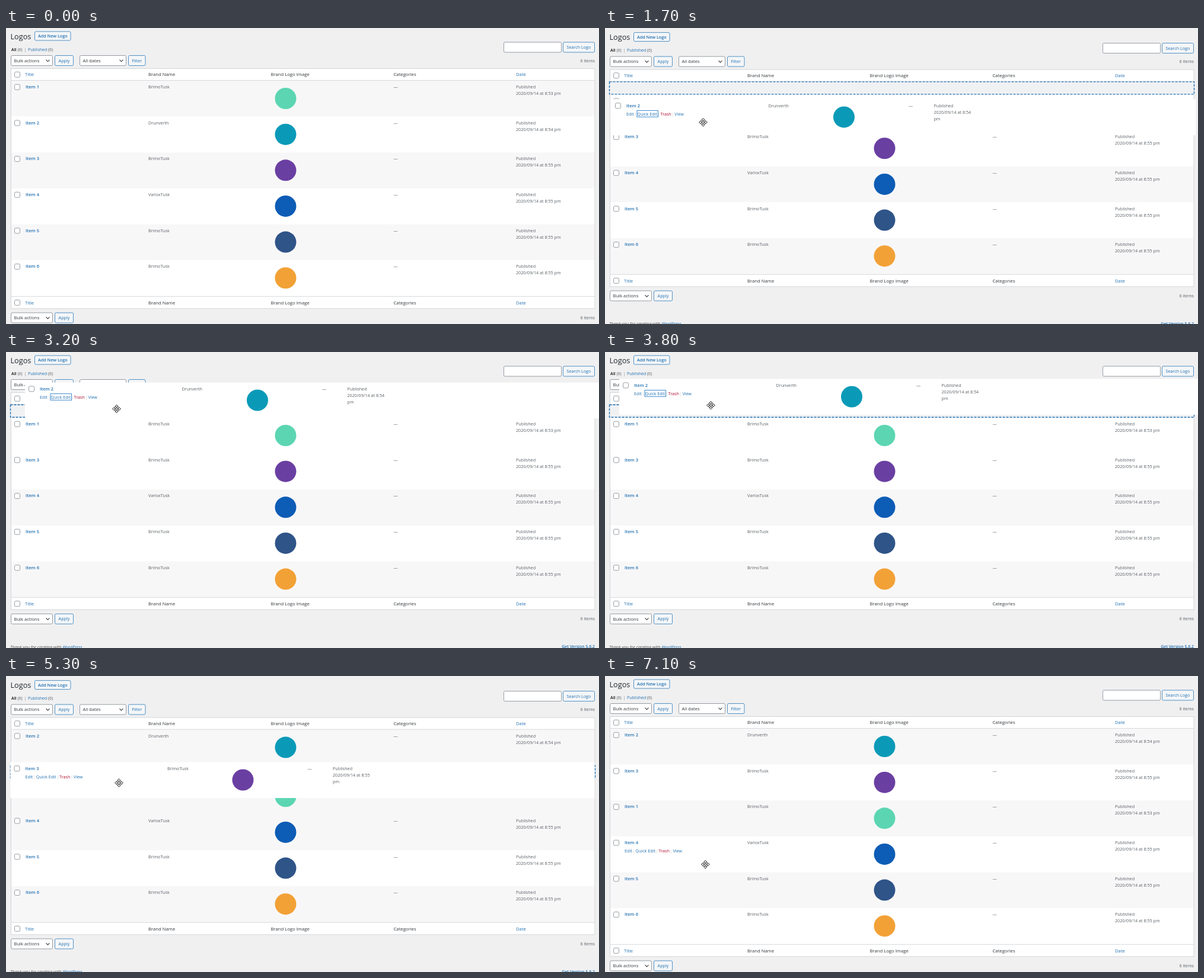
An HTML page for the animation above (7.2 s loop, 1000x500 px).

```html
<!DOCTYPE html>
<html lang="en">
<head>
<meta charset="utf-8">
<title>Logos</title>
<style>
  html, body { margin: 0; width: 100%; height: 100%; overflow: hidden; background: #f0f0f1; }
  svg { display: block; width: 100%; height: 100%; font-family: "Open Sans", "Noto Sans", sans-serif; }
</style>
</head>
<body>
<svg id="stage" viewBox="0 0 1000 500"></svg>
<script>
const stage = document.getElementById('stage');
const LOOP = 7200, STEP = 100;
const BLUE = '#2271b1', DARK = '#32373c', GRAY = '#5a6066', RED = '#b01030';
const LEFT = 8, WIDTH = 985, TOP = 89, ROW = 60.65, GAP = 22, TITLE = 10.5;
const COLS = [240, 446.5, 653.5, 860];
const LIFTED_COLS = [272.5, 375, 509, 551.5];

const brands = ['BrimoTusk', 'Drunverth', 'BrimoTusk', 'VarloxTusk', 'BrimoTusk', 'BrimoTusk'];
const colors = ['#5cd6b2', '#0a9ab8', '#6a3fa2', '#0d5cb5', '#2f5488', '#f2a136'];

// Key points are [time, x, y]; a drag's path gives the lifted row's x shift and title height
const drags = [
  { item: 1, from: 1000, to: 3900, gripX: 162.5, gripY: [24.5, 34],
    path: [[1000, 0, 161.7], [1300, .5, 157], [2300, 7.5, 83], [2800, -7, 11.5], [3200, 24, 62], [3600, 16, 56]] },
  { item: 2, from: 5000, to: 6000, gripX: 191, gripY: [24.5, 24.5],
    path: [[5000, 0, 222], [5300, -.5, 156], [5500, 12, 142], [5700, 0, 150]] }
];
const freePath = [[100, 200, 440], [800, 162.5, 186], [3900, 178.5, 90], [4500, 154.3, 248],
  [4800, 191, 246.5], [6000, 191, 174.5], [6900, 169.3, 318.3]];

const clamp = (v, lo, hi) => Math.max(lo, Math.min(hi, v));
const mix = (a, b, k) => a + (b - a) * k;
const ease = k => k * k * (3 - 2 * k);

function along(path, t) {
  const n = clamp(path.findLastIndex(p => p[0] <= t), 0, path.length - 2);
  const a = path[n], b = path[n + 1];
  const k = ease(clamp((t - a[0]) / (b[0] - a[0]), 0, 1));
  return [mix(a[1], b[1], k), mix(a[2], b[2], k)];
}

const text = (x, y, s, fill = GRAY, size = 7.2, extra = '') =>
  `<text x="${x}" y="${y + size * .36}" font-size="${size}" fill="${fill}" ${extra}>${s}</text>`;
const span = (s, fill, dx = 0, extra = '') => `<tspan fill="${fill}" dx="${dx}" ${extra}>${s}</tspan>`;
const rect = (x, y, w, h, fill, extra = '') =>
  `<rect x="${x}" y="${y}" width="${w}" height="${h}" fill="${fill}" ${extra}/>`;
const move = (x, y, s) => `<g transform="translate(${x} ${y})">${s}</g>`;
const BOLD = 'font-weight="600"', END = 'text-anchor="end"', MID = 'text-anchor="middle"';

const box = (x, y, w, h, fill, stroke) =>
  rect(x, y - h / 2, w, h, fill, `rx="2" stroke="${stroke}" stroke-width=".9"`);
const field = (x, y, w, h = 17) => box(x, y, w, h, '#fff', '#8c9299');
const checkbox = y => field(14.5, y, 9, 9);
const button = (x, y, w, s, h = 17, extra = '') =>
  box(x, y, w, h, '#f4f6f8', '#4187be') + text(x + w / 2, y, s, BLUE, 7.2, `${MID} ${extra}`);
const select = (x, y, w, s) => field(x, y, w) + text(x + 5, y, s, DARK, 7.6) +
  `<path d="M${x + w - 11} ${y - 1.4}l3 3 3-3" fill="none" stroke="#444" stroke-width="1.2"/>`;
const bulk = y => select(8.5, y, 70, 'Bulk actions') + button(82.5, y, 31, 'Apply') +
  text(993, y, '6 items', GRAY, 7.2, END);

function topBar() {
  const views = span('All', '#111', 0, BOLD) + span('(6)', GRAY, 2) + span('|', '#888', 3) +
    span('Published', BLUE, 2.5) + span('(6)', GRAY, 1.8);
  return text(7.5, 14, 'Logos', '#23282d', 12.7) + button(48.5, 13.5, 60.5, 'Add New Logo', 15, BOLD) +
    text(9, 36, views, GRAY, 7) + field(839.5, 32.5, 97) + button(939.5, 32.5, 53, 'Search Logo') +
    bulk(55) + select(124.5, 55, 78, 'All dates') + button(206.5, 55, 28.5, 'Filter');
}

function headings(y) {
  const labels = ['Brand Name', 'Brand Logo Image', 'Categories', 'Date'];
  return checkbox(y) + text(32, y, 'Title', BLUE, 7.7) +
    labels.map((s, i) => text(COLS[i], y, s, s === 'Date' ? BLUE : DARK, 7.7)).join('');
}

function bottomBar(end) {
  const foot = end + 83.7, line = 'text-decoration="underline"';
  return bulk(end + 36.6) +
    text(7, foot, `Thank you for creating with ${span('WordPress', BLUE, 0, line)}.`, '#555', 7.2, 'font-style="italic"') +
    text(993, foot, 'Get Version 5.6.2', BLUE, 6.9, `${END} ${BOLD} ${line}`);
}

function actions(ring) {
  const y = TITLE + 14;
  const links = ['Edit', 'Quick Edit', 'Trash', 'View']
    .map((s, i) => (i ? span('|', '#ccc', .8) : '') + span(s, s === 'Trash' ? RED : BLUE, i ? .8 : 0));
  const focus = ring ? rect(51, y - 5.5, 35.5, 10.8, 'none', 'stroke="#4f94d4" stroke-width="1.1"') : '';
  return focus + text(33, y, links.join(''));
}

// Row content with its top edge at 0
function row(id, { lifted = false, hover = false, ring = false, fill = '#fff' }) {
  const [brand, image, dash, date] = lifted ? LIFTED_COLS : COLS;
  const stamp = `2020/09/14 at 8:${Math.min(53 + id, 55)}`;
  const lines = lifted ? ['Published', stamp, 'pm'] : ['Published', stamp + ' pm'];
  return rect(LEFT, 0, WIDTH, ROW, fill) + checkbox(TITLE + .3) +
    text(33, TITLE, `Item ${id + 1}`, BLUE, 7.5, BOLD) + text(brand, TITLE, brands[id]) +
    `<circle cx="${image + 25}" cy="30" r="18" fill="${colors[id]}"/>` + text(dash, TITLE, '—') +
    lines.map((s, i) => text(date, TITLE + 11 * i, s)).join('') + (hover ? actions(ring) : '');
}

function cursor(x, y) {
  const arm = a => `<path d="M0-7L2.8-3.7Q0-2-2.8-3.7Z" transform="rotate(${a})"/>`;
  return move(x, y, '<g fill="#fff" stroke="#222" stroke-linejoin="round">' +
    [0, 90, 180, 270].map(arm).join('') + '<circle r="1.7"/></g>');
}

const slotOf = titleY => clamp(Math.round((titleY - TOP - TITLE) / ROW), 0, 5);

// Every finished drag leaves its row in the slot it hovered over
function orderAt(t) {
  const order = [0, 1, 2, 3, 4, 5];
  for (const { item, to, path } of drags.filter(d => t >= d.to)) {
    order.splice(order.indexOf(item), 1);
    order.splice(slotOf(along(path, to)[1]), 0, item);
  }
  return order;
}

function scene(t) {
  const drag = drags.find(d => t >= d.from && t < d.to);
  const ring = t < drags[0].to;
  const slots = orderAt(t);
  let [cx, cy] = along(freePath, t), shift = 0, lift = '', held = '';

  if (drag) {
    const { item, from, gripX, gripY, path } = drag;
    const [dx, titleY] = along(path, t);
    cx = gripX + dx;
    cy = titleY + mix(...gripY, clamp((t - from - 300) / 1000, 0, 1));
    // The page slips down a little, then settles back
    shift = t - from < 1700 ? 1.6 : 0;
    // The lifted row keeps its place in the striping but takes no height
    const at = slotOf(titleY - shift);
    slots.splice(at < slots.indexOf(item) ? at : at + 1, 0, 'gap');
    lift = move(dx, titleY - TITLE, row(item, { lifted: true, hover: true, ring }));
  }

  let y = TOP, rows = '';
  slots.forEach((slot, i) => {
    if (slot === 'gap') {
      held = rect(7.5, y + .3, 986, GAP - 1, '#f0f1f3', `stroke="${BLUE}" stroke-width="1.4" stroke-dasharray="4 2"`);
      y += GAP;
    } else if (slot !== drag?.item) {
      const hover = !drag && t > 0 && cy >= y && cy < y + ROW;
      rows += move(0, y, row(slot, { hover, ring: ring && slot === 1, fill: i % 2 ? '#fff' : '#f8f7f8' }));
      y += ROW;
    }
  });

  const line = ly => rect(LEFT, ly, WIDTH, .9, '#d3d5d8');
  const frame = (fill, extra) => rect(LEFT + .5, 68.5, WIDTH - .5, y - 47.5, fill, extra);
  const page = topBar() + frame('#fff') + headings(78.7) + rows + line(TOP - .9) + line(y) + headings(y + 11) +
    frame('none', 'stroke="#d0d2d5" stroke-width=".9"') + bottomBar(y) + held;

  return rect(0, 0, 1000, 500, '#f0f0f1') + move(0, shift, page) + lift + (t > 0 ? cursor(cx, cy) : '');
}

let shown = -1;
function tick() {
  const t = Math.floor(performance.now() % LOOP / STEP) * STEP;
  if (t !== shown) stage.innerHTML = scene(shown = t);
  requestAnimationFrame(tick);
}
tick();
</script>
</body>
</html>
```
